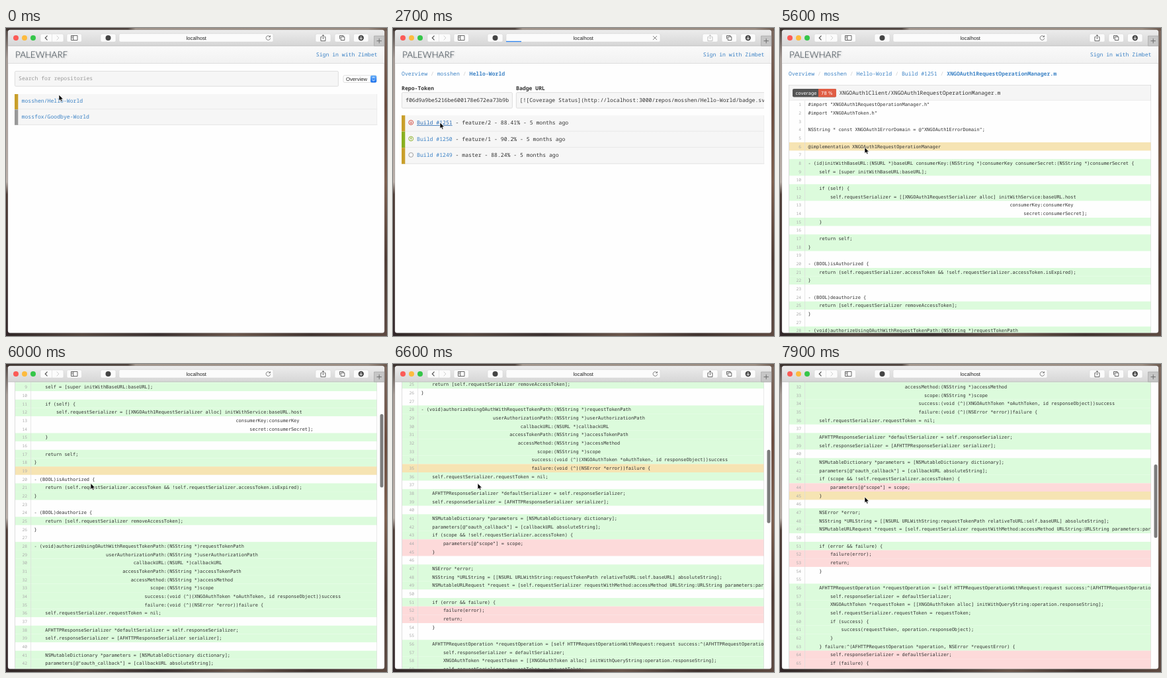
Animation of 576 by 466 pixels, one loop 8000 ms. Source, as an HTML page:

```html
<!DOCTYPE html>
<html lang="en">
<head>
<meta charset="utf-8">
<title>Coverage browser</title>
<style>
html, body { margin: 0; width: 100%; height: 100%; overflow: hidden; }
svg { display: block; width: 576px; height: 466px; }
text { font: 8.13px "Noto Sans Mono", "DejaVu Sans Mono", monospace; fill: #333; white-space: pre; text-rendering: geometricPrecision; }
.link { fill: #3d83c6; }
.hover { text-decoration: underline; fill: #2a6db5; }
.bold { font-weight: 700; }
.dim { fill: #ccc; }
.hint { fill: #999; }
.code { font: 6.95px "DejaVu Sans Mono", monospace; }
.num { font-size: 6.3px; fill: #aaa; text-anchor: end; }
.ui { font: 7.7px "Liberation Sans", Arial, sans-serif; fill: #222; }
.badge { font: 6.9px "DejaVu Sans", sans-serif; fill: #fff; }
.brand { font: 300 13.5px Lato, sans-serif; fill: #34404a; filter: drop-shadow(1.5px 1.8px 1px #aaa); }
.field { fill: #f6f6f6; stroke: #d9d9d9; stroke-width: .8; }
.btn { fill: #fbfbfb; stroke: #d2d2d2; stroke-width: .5; }
.icon { fill: none; stroke: #555; stroke-width: .9; }
</style>
</head>
<body>
<svg viewBox="0 0 576 466" xml:space="preserve">
  <defs>
    <linearGradient id="bar" x2="0" y2="1"><stop stop-color="#ececec"/><stop offset="1" stop-color="#d6d6d6"/></linearGradient>
    <linearGradient id="head" x2="0" y2="1"><stop stop-color="#fafafa"/><stop offset="1" stop-color="#f1f1f1"/></linearGradient>
    <linearGradient id="blue" x2="0" y2="1"><stop stop-color="#6bb1f8"/><stop offset="1" stop-color="#1a70ee"/></linearGradient>
    <linearGradient id="left" x2="0" y2="1">
      <stop stop-color="#4b403c"/><stop offset=".1" stop-color="#a59a94"/><stop offset=".5" stop-color="#b9aea8"/>
      <stop offset=".54" stop-color="#4d3a34"/><stop offset="1" stop-color="#33272a"/>
    </linearGradient>
    <linearGradient id="right" x2="0" y2="1">
      <stop stop-color="#7c6a60"/><stop offset=".25" stop-color="#6a4a3c"/><stop offset=".5" stop-color="#7d5f4e"/>
      <stop offset=".75" stop-color="#4e3a33"/><stop offset="1" stop-color="#5d4a42"/>
    </linearGradient>
    <linearGradient id="top">
      <stop stop-color="#3d3430"/><stop offset=".32" stop-color="#4f433d"/><stop offset=".34" stop-color="#a0948a"/>
      <stop offset=".95" stop-color="#998b80"/><stop offset="1" stop-color="#6a584d"/>
    </linearGradient>
    <linearGradient id="rock">
      <stop stop-color="#2f2626"/><stop offset=".2" stop-color="#55463f"/><stop offset=".4" stop-color="#3a302f"/>
      <stop offset=".6" stop-color="#6a564b"/><stop offset=".8" stop-color="#40332f"/><stop offset="1" stop-color="#5e4a41"/>
    </linearGradient>
    <clipPath id="view"><path d="M3 27H572V458a3 3 0 0 1-3 3H6a3 3 0 0 1-3-3Z"/></clipPath>
    <clipPath id="body"><rect x="13" y="0" width="548" height="1100"/></clipPath>
  </defs>

  <rect width="576" height="466" fill="url(#rock)"/>
  <rect width="4" height="466" fill="url(#left)"/>
  <rect x="571" width="5" height="466" fill="url(#right)"/>
  <rect width="576" height="4" fill="url(#top)"/>
  <rect x="2.8" y="2.8" width="569.4" height="458.6" rx="3.5" fill="#fefefe" stroke="#0004" stroke-width=".6"/>

  <g clip-path="url(#view)">
    <g id="scroll">
      <rect x="3" y="27" width="569" height="26.5" fill="url(#head)"/>
      <path d="M3 53.5H572" stroke="#dedede"/>
      <text class="brand" x="14" y="45">PALEWHARF</text>
      <text class="link" x="468.8" y="42.7">Sign in with Zimbet</text>
      <g id="pages"></g>
    </g>
    <rect id="thumb" x="565.5" y="28" width="5" height="111" rx="2.5" fill="#7d7d7d"/>
  </g>

  <path d="M3 27V7a4 4 0 0 1 4-4H568a4 4 0 0 1 4 4V27Z" fill="url(#bar)"/>
  <path d="M3 27H572" stroke="#b9b9b9" stroke-width=".8"/>
  <circle cx="15" cy="15" r="4" fill="#fb5b57"/>
  <circle cx="28" cy="15" r="4" fill="#fdbb3f"/>
  <circle cx="41" cy="15" r="4" fill="#35c649"/>
  <g class="btn">
    <rect x="52" y="9" width="35" height="12" rx="2"/>
    <rect x="92" y="9" width="22.5" height="12" rx="2"/>
    <rect x="143" y="9" width="23" height="12" rx="2"/>
    <rect x="171" y="8.5" width="233" height="12.5" rx="2"/>
    <rect x="468" y="9" width="23" height="12" rx="2"/>
    <rect x="497" y="9" width="22.5" height="12" rx="2"/>
    <rect x="525.5" y="9" width="22.5" height="12" rx="2"/>
    <path d="M69.5 9V21"/>
  </g>
  <g class="icon">
    <path d="M62.5 11.7 59.3 15l3.2 3.3" stroke-width="1.2"/>
    <path d="M76.7 11.7 79.9 15l-3.2 3.3" stroke="#ccc"/>
    <path d="M98.5 11.5h9.5v7h-9.5ZM101.8 11.5v7M99.5 13.3h1.3M99.5 15h1.3"/>
    <path id="share" d="M477.5 13.5h-1.6v6h7v-6h-1.6M479.4 17v-6.3M477.4 12.3l2-2 2 2"/>
    <path d="M504.5 16.5v-5h5.5v1.7M506.3 13.3h5.5v5.2h-5.5Z"/>
    <path id="reload" d="M399.2 13.2a3.3 3.3 0 1 0 .5 2.2M399.5 11.3v2.2h-2.3" stroke-width=".7"/>
    <path id="stop" d="M393 12l6 6M399 12l-6 6" stroke-width=".7"/>
  </g>
  <circle cx="154.5" cy="15" r="4" fill="#444"/>
  <circle cx="536.8" cy="15" r="4.2" fill="#4a4a4a"/>
  <path d="M536.8 12.5v4.6M534.8 15.3l2 2 2-2" fill="none" stroke="#fff"/>
  <text class="ui" x="287.8" y="17.9" text-anchor="middle">localhost</text>
  <rect id="load" x="171" y="19.8" height="1.3" fill="#2b83f0"/>
  <path d="M556.5 27V12H572V27Z" fill="#c6c6c6" stroke="#a5a5a5" stroke-width=".7"/>
  <path d="M560.5 19.5h7.4M564.2 15.8v7.4" stroke="#666" stroke-width=".9"/>

  <g id="cursor">
    <path id="arrow" d="M0 0V9.2L2.1 7.3 3.5 10.4 5.1 9.7 3.8 6.7H6.6Z" fill="#000" stroke="#fff" stroke-width=".7"/>
    <path id="hand" d="M-.7.6C-.7-.6 1-.6 1 .6V3.3C1.5 2.6 2.6 2.8 2.7 3.5 3.2 3 4.2 3.2 4.3 4 4.9 3.6 5.7 4 5.7 4.8V7C5.7 8.3 5 8.8 4.9 10H-.1C-.4 8.5-2 7.3-2.8 5.9-3.2 4.9-2 4.5-1.4 5.2L-.7 6Z" fill="#fff" stroke="#000" stroke-width=".8"/>
  </g>
</svg>

<script>
const $ = id => document.getElementById(id);
const CHAR = 4.88, LINE = 38 / 3, TOP = 109.67;
const GOLD = '#c99f2b', GREEN = '#8ab01f', GREY = '#999', RED = '#cc5145';
const USER = 'mosshen', LIB = 'XNGOAuth1Client/';

const esc = s => s.replace(/&/g, '&amp;').replace(/</g, '&lt;');
const text = (x, y, s, cls = '', id = '') => `<text x="${x}" y="${y}" class="${cls}"${id && ` id="${id}"`} xml:space="preserve">${esc(s)}</text>`;
const rect = (x, y, w, h, attr) => `<rect x="${x}" y="${y}" width="${w}" height="${h}" ${attr}/>`;

function row(y, h, color, link, rest = '', id = '', x = 23.5) {
  const base = y + h / 2 + 1.6;
  return rect(13, y, 548, h, 'fill="#f6f6f6"') +
    `<path d="M18 ${y + h - .4}H561" stroke="#c4c4c4" stroke-width=".7" stroke-dasharray="1 1"/>` +
    `<path d="M560.7 ${y}v${h}" stroke="#e6e6e6" stroke-width=".6"/>` +
    rect(13, y, 5.3, h, `fill="${color}"`) +
    text(x, base, link, 'link', id) + text(x + link.length * CHAR, base, rest);
}

function crumbs(items) {
  let x = 13;
  return items.map((s, i) => {
    const last = i === items.length - 1;
    const out = text(x, 72, s, last ? 'link bold' : 'link') +
      (last ? '' : text(x + s.length * CHAR + 4.9, 72, '/', 'dim'));
    x += s.length * CHAR + 14.7;
    return out;
  }).join('');
}

function status(y, color, arrow) {
  return `<g fill="none" stroke="${color}" stroke-width=".9" transform="translate(27.2 ${y})"><circle r="3.4"/><path d="${arrow}"/></g>`;
}

const overview =
  rect(13.4, 65.4, 489, 22.8, 'rx="1.5" class="field"') +
  text(19, 79, 'Search for repositories', 'hint') +
  rect(510, 71.8, 50, 10.6, 'rx="2" fill="#fff" stroke="#ccc" stroke-width=".6"') +
  rect(551, 71.8, 9.2, 10.6, 'rx="2" fill="url(#blue)"') +
  '<path d="M553.8 76l1.8-2 1.8 2M553.8 78.2l1.8 2 1.8-2" fill="none" stroke="#fff" stroke-width=".9"/>' +
  text(514, 79.8, 'Overview', 'ui') +
  row(100, 23.4, GOLD, USER + '/Hello-World', '', 'link0') +
  row(123.4, 23.4, GREY, 'mossfox/Goodbye-World');

const builds = [
  [1251, 'feature/2 - 88.41%', GOLD, '#cf3a30', 'M0-1.8V1.6M-1.3.4 0 1.7 1.3.4'],
  [1250, 'feature/1 - 90.2%', GREEN, '#86ad1c', 'M0 1.8V-1.6M-1.3-.4 0-1.7 1.3-.4'],
  [1249, 'master - 88.24%', GOLD, '#999', '']
];
const repo = crumbs(['Overview', USER, 'Hello-World']) +
  text(13, 94, 'Repo-Token', 'bold') + text(186, 94, 'Badge URL', 'bold') +
  rect(13.4, 97.6, 167, 23.6, 'rx="1.5" class="field"') +
  text(19, 112, 'f06d9a9be5216be600178e672ea73b9b') +
  '<g clip-path="url(#body)">' + rect(186.4, 97.6, 400, 23.6, 'rx="1.5" class="field"') +
  text(191.5, 112, `[![Coverage Status](http://localhost:3000/repos/${USER}/Hello-World/badge.svg)]`) + '</g>' +
  builds.map(([n, info, color, ring, arrow], i) => {
    const y = 132.2 + i * 24.5;
    return row(y, 24.5, color, 'Build #' + n, ` - ${info} - 5 months ago`, 'build' + i, 36) + status(y + 10.8, ring, arrow);
  }).join('');

const files = [
  ['NSDictionary+XNGOAuth1Additions', '100.0'], ['NSString+XNGOAuth1Additions', '100.0'],
  ['XNGOAuth1RequestOperationManager', '78.16'], ['XNGOAuth1RequestSerializer', '100.0'], ['XNGOAuthToken', '91.38']
];
const build = crumbs(['Overview', USER, 'Hello-World', 'Build #1251']) +
  files.map(([name, pct], i) => row(86 + i * 23.45, 23.45, i === 2 ? RED : GREEN, `${LIB}${name}.m`, ` ${pct}% covered`, 'file' + i)).join('');

const colon = s => ' '.repeat(47 - s.indexOf(':')) + s;
const code = `#import "XNGOAuth1RequestOperationManager.h"
#import "XNGOAuthToken.h"

NSString * const XNGOAuth1ErrorDomain = @"XNGOAuth1ErrorDomain";

@implementation XNGOAuth1RequestOperationManager

- (id)initWithBaseURL:(NSURL *)baseURL consumerKey:(NSString *)consumerKey consumerSecret:(NSString *)consumerSecret {
    self = [super initWithBaseURL:baseURL];

    if (self) {
        self.requestSerializer = [[XNGOAuth1RequestSerializer alloc] initWithService:baseURL.host
${' '.repeat(73)}consumerKey:consumerKey
${' '.repeat(78)}secret:consumerSecret];
    }

    return self;
}

- (BOOL)isAuthorized {
    return (self.requestSerializer.accessToken && !self.requestSerializer.accessToken.isExpired);
}

- (BOOL)deauthorize {
    return [self.requestSerializer removeAccessToken];
}

- (void)authorizeUsingOAuthWithRequestTokenPath:(NSString *)requestTokenPath
${['userAuthorizationPath:(NSString *)userAuthorizationPath', 'callbackURL:(NSURL *)callbackURL',
  'accessTokenPath:(NSString *)accessTokenPath', 'accessMethod:(NSString *)accessMethod', 'scope:(NSString *)scope',
  'success:(void (^)(XNGOAuthToken *oAuthToken, id responseObject))success',
  'failure:(void (^)(NSError *error))failure {'].map(colon).join('\n')}
    self.requestSerializer.requestToken = nil;

    AFHTTPResponseSerializer *defaultSerializer = self.responseSerializer;
    self.responseSerializer = [AFHTTPResponseSerializer serializer];

    NSMutableDictionary *parameters = [NSMutableDictionary dictionary];
    parameters[@"oauth_callback"] = [callbackURL absoluteString];
    if (scope && !self.requestSerializer.accessToken) {
        parameters[@"scope"] = scope;
    }

    NSError *error;
    NSString *URLString = [[NSURL URLWithString:requestTokenPath relativeToURL:self.baseURL] absoluteString];
    NSMutableURLRequest *request = [self.requestSerializer requestWithMethod:accessMethod URLString:URLString parameters:parameters error:&error];

    if (error && failure) {
        failure(error);
        return;
    }

    AFHTTPRequestOperation *requestOperation = [self HTTPRequestOperationWithRequest:request success:^(AFHTTPRequestOperation *operation
        self.responseSerializer = defaultSerializer;
        XNGOAuthToken *requestToken = [[XNGOAuthToken alloc] initWithQueryString:operation.responseString];
        self.requestSerializer.requestToken = requestToken;
        if (success) {
            success(requestToken, operation.responseObject);
        }
    } failure:^(AFHTTPRequestOperation *operation, NSError *requestError) {
        self.responseSerializer = defaultSerializer;
        if (failure) {
            failure(requestError);`.split('\n');

// One mark per line: g covered, r missed, dot not counted
const marks = '.......gg.gg..g.gg..gg..g..ggggggggg.gg.gggrr.ggg.grr..ggggggggrrr';
const tint = { g: '#dcfbdc', r: '#fddada', '.': '#fefefe' };
const source = crumbs(['Overview', USER, 'Hello-World', 'Build #1251', files[2][0] + '.m']) +
  rect(13.4, 86.4, 547.2, 1000, 'fill="#fefefe" stroke="#d5d5d5" stroke-width=".8"') +
  rect(13.8, 86.8, 546.4, 22.6, 'fill="#f5f5f5"') + '<path d="M13 109.4H561" stroke="#ddd" stroke-width=".7"/>' +
  rect(19, 92, 66, 12.4, 'rx="2" fill="#555"') +
  '<path d="M58 92H83a2 2 0 0 1 2 2v8.4a2 2 0 0 1-2 2H58Z" fill="#e05d44"/>' +
  text(23.5, 100.8, 'coverage', 'badge') + text(62, 100.8, '78 %', 'badge') +
  text(89.7, 101.1, `${LIB}${files[2][0]}.m`) +
  '<g clip-path="url(#body)">' + code.map((s, i) => {
    const y = TOP + i * LINE;
    return rect(14, y, 546.4, LINE + .02, `id="line${i}" fill="${tint[marks[i]]}"`) +
      text(32, y + 8.7, String(i + 1), 'num') + text(42.5, y + 8.7, s, 'code');
  }).join('') + `<path d="M37.6 ${TOP}V1080" stroke="#ddd" stroke-width=".7"/></g>`;

$('pages').innerHTML = [overview, repo, build, source].map((s, i) => `<g id="page${i}">${s}</g>`).join('');

// Linear interpolation through [time, ...values] stops
function along(stops, t) {
  const n = stops.findIndex(s => s[0] > t);
  if (n < 0) return stops[stops.length - 1].slice(1);
  if (!n) return stops[0].slice(1);
  const a = stops[n - 1], b = stops[n], k = (t - a[0]) / (b[0] - a[0]);
  return a.slice(1).map((v, i) => v + (b[i + 1] - v) * k);
}

const pointer = [[0, 80, 101], [400, 77, 107], [1700, 77, 107], [2300, 71, 143], [3700, 71, 143],
  [4000, 100, 142], [4900, 100, 142], [5500, 128, 180.5], [7300, 128, 180.5], [7700, 128, 201]];
const scrolled = [[5600, 0], [5700, 35], [5800, 100], [5900, 162], [6000, 182.5], [6200, 225],
  [6500, 366], [6600, 389], [6800, 420], [7300, 455], [7900, 474]];
const loads = [[900, 1200, 1700], [2500, 3000, 3500], [4400, 4900, 5400]];
const hovers = [['link0', 200], ['build0', 2200], ['file2', 3800]];
const show = (id, on) => $(id).style.display = on ? '' : 'none';
let lit = -1;

function draw(t) {
  const page = loads.filter(l => t >= l[1]).length;
  for (let i = 0; i < 4; i++) show('page' + i, i === page);

  const load = loads.find(l => t >= l[0] && t < l[2]);
  let width = 0;
  if (load) {
    const [a, b, c] = load;
    width = along([[a, 5], [a + 200, 23], [b, 90], [b + 200, 233], [c, 233]], t)[0];
    $('load').style.opacity = along([[b + 200, 1], [c, .2]], t)[0];
  }
  $('load').setAttribute('width', width);
  const busy = load && t < load[1] + 300;
  show('stop', busy);
  show('reload', !busy);
  $('share').style.stroke = busy ? '#bbb' : '';

  const [x, y] = along(pointer, t);
  $('cursor').setAttribute('transform', `translate(${x} ${y})`);
  const hand = hovers.some(([, from], i) => t >= from && t < loads[i][0]);
  show('hand', hand);
  show('arrow', !hand);
  for (const [id, from] of hovers) $(id).classList.toggle('hover', t >= from);

  const top = along(scrolled, t)[0];
  $('scroll').setAttribute('transform', `translate(0 ${-top})`);
  $('thumb').setAttribute('y', 28 + top * .2615);
  show('thumb', t >= 5700);

  // The line highlight trails the scroll by one tick
  const now = page === 3 ? Math.floor((y + along(scrolled, t - 100)[0] - TOP) / LINE) : -1;
  if (now !== lit) {
    if (lit >= 0) $('line' + lit).setAttribute('fill', tint[marks[lit]]);
    if (now >= 0) $('line' + now).setAttribute('fill', '#f6e4b3');
    lit = now;
  }
}

const start = performance.now();
function tick() {
  draw(Math.floor((performance.now() - start) % 8000 / 100) * 100);
  requestAnimationFrame(tick);
}
tick();
</script>
</body>
</html>
```
